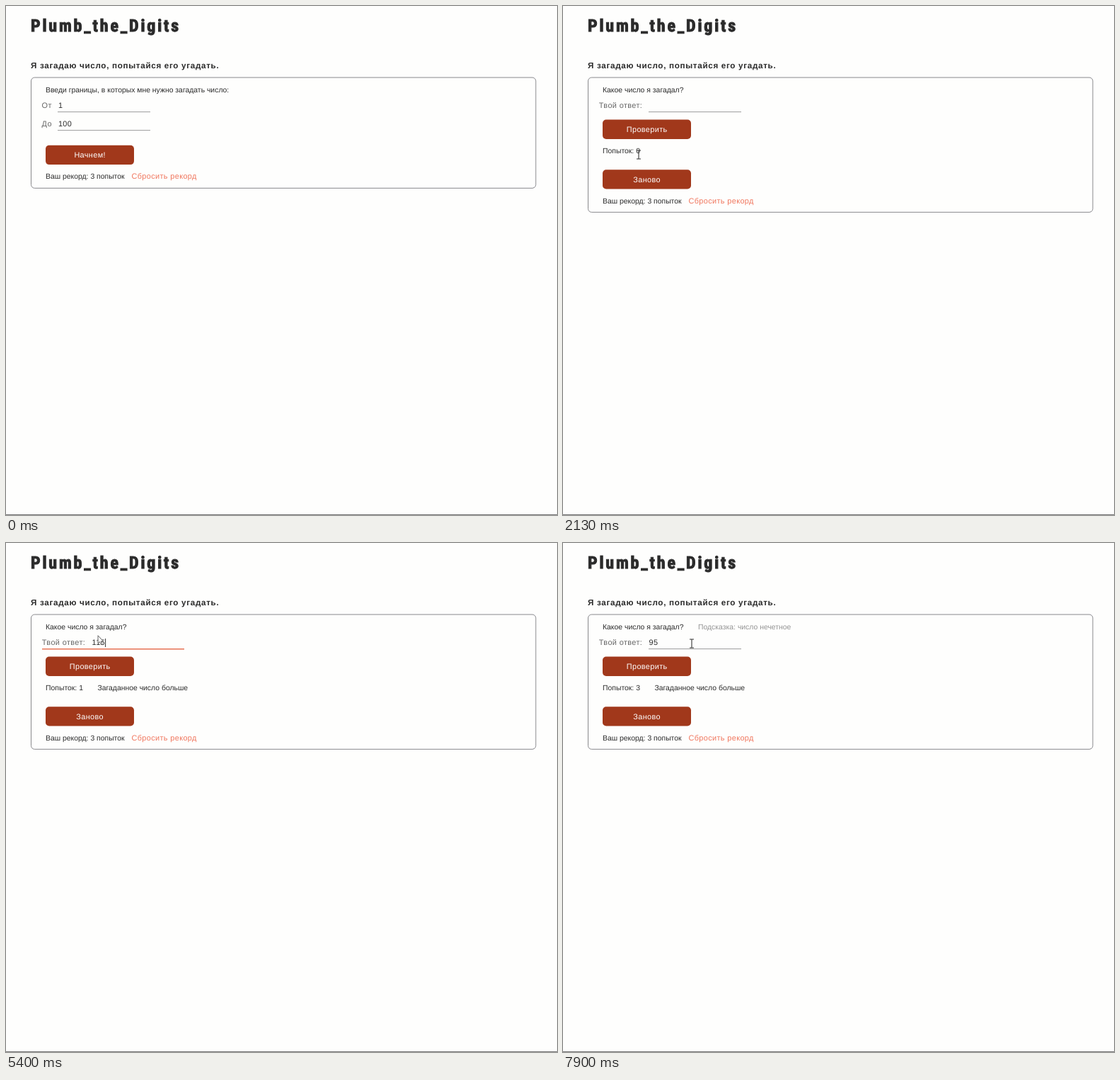
Recreate the animation shown at these times as an HTML page. Size 779x719 px, loop 8 s.

```html
<!DOCTYPE html>
<html lang="ru">
<head>
<meta charset="utf-8">
<title>Plumb_the_Digits</title>
<style>
  html, body { margin: 0; width: 100%; height: 100%; overflow: hidden; background: #fefefd; }
  svg { display: block; width: 779px; height: 719px; }
  text {
    font: 10.42px 'Liberation Sans', Arial, sans-serif;
    fill: #2b2b2b; white-space: pre; text-rendering: geometricPrecision;
  }
  .title {
    font: 700 24px 'Roboto Condensed', Roboto, sans-serif; font-stretch: 75%;
    letter-spacing: 2.8px; stroke: #2b2b2b; stroke-width: 1px;
  }
  .lead { font-size: 11.67px; font-weight: 700; letter-spacing: .68px; }
  .label, .value, .link, .btn-text { font-size: 10.89px; letter-spacing: .39px; }
  .label { fill: #666; }
  .link { fill: #f0755c; }
  .hint { fill: #949494; }
  .btn { fill: #a1381b; }
  .btn-text { fill: #fff; text-anchor: middle; }
  .panel { fill: none; stroke: #88888c; }
  .line { stroke: #9c9c9c; }
  .focus { stroke: #e97557; stroke-width: 1.6; }
  .selection { fill: #2c5fd3; }
  .caret { stroke: #333; }
  .pointer { stroke: #555; stroke-width: .9; stroke-linejoin: round; fill: #fff; }
  .beam { fill: none; stroke: #333; stroke-width: 1.1; }
</style>
</head>
<body>
<svg id="stage" viewBox="0 0 779 719"></svg>
<script>
const LOOP = 8000;
const START = 2040;
const CHAR = 6.44;
const stage = document.getElementById('stage');

function add(parent, tag, attrs, content = '') {
  const el = document.createElementNS('http://www.w3.org/2000/svg', tag);
  for (const key in attrs) el.setAttribute(key, attrs[key]);
  el.textContent = content;
  return parent.appendChild(el);
}
const text = (parent, x, y, content, cls = '') =>
  add(parent, 'text', { x, y, class: cls }, content);
const line = (parent, x1, x2, y, cls) =>
  add(parent, 'line', { x1, x2, y1: y, y2: y, class: cls });
function button(parent, y, label) {
  add(parent, 'rect', { x: 56, y, width: 125, height: 27.3, rx: 5, class: 'btn' });
  text(parent, 118.7, y + 17.5, label, 'btn-text');
}
function record(parent, y) {
  text(parent, 56, y, 'Ваш рекорд: 3 попыток');
  text(parent, 177.4, y, 'Сбросить рекорд', 'link');
}
const show = (el, on) => el.setAttribute('visibility', on ? 'inherit' : 'hidden');

// Fixed parts
text(stage, 35, 35.8, 'Plumb_the_Digits', 'title');
text(stage, 35, 87.7, 'Я загадаю число, попытайся его угадать.', 'lead');
const panel = add(stage, 'rect', { x: 35.5, y: 101, width: 713.5, height: 156.3, rx: 5, class: 'panel' });
add(stage, 'rect', { y: 718, width: 779, height: 1, fill: '#777' });

// Range form
const setup = add(stage, 'g', {});
text(setup, 56, 121.6, 'Введи границы, в которых мне нужно загадать число:');
text(setup, 50.6, 144.2, 'От', 'label');
text(setup, 73.9, 144.4, '1', 'value');
line(setup, 73, 204, 149.6, 'line');
text(setup, 50.6, 170.3, 'До', 'label');
const upper = text(setup, 73.9, 170.4, '', 'value');
line(setup, 73, 204, 175.6, 'line');
const upperFocus = line(setup, 51, 204, 175.8, 'focus');
button(setup, 196.8, 'Начнем!');
record(setup, 244.1);

// Guessing form
const game = add(stage, 'g', {});
text(game, 56, 121.6, 'Какое число я загадал?');
const hint = text(game, 191, 121.6, 'Подсказка: число нечетное', 'hint');
text(game, 50.8, 144.2, 'Твой ответ:', 'label');
const selection = add(game, 'rect', { x: 121.8, y: 134.6, width: 0, height: 12.6, class: 'selection' });
const answer = text(game, 121.5, 144.4, '', 'value');
line(game, 121, 252, 149.6, 'line');
const answerFocus = line(game, 51, 252, 149.8, 'focus');
button(game, 160.6, 'Проверить');
const tries = text(game, 56, 207.7);
const verdict = text(game, 129.4, 207.7);
button(game, 231.2, 'Заново');
record(game, 278.8);

const caret = add(stage, 'line', { class: 'caret' });

// Pointers, each drawn around its hot spot
const pointer = add(stage, 'g', { class: 'pointer' });
const shapes = {
  arrow: add(pointer, 'path', { d: 'M0 0V11L2.5 8.8L4.3 12.8L6 12L4.3 8.2H7.5Z' }),
  hand: add(pointer, 'path', {
    d: 'M-1 -5.5Q0 -7 1 -5.5V-1.5L5 -.5Q6 0 6 1.5L5 6.5H-.5L-4 1.5Q-4 0 -2.5 .5L-1 2Z'
  }),
  beam: add(pointer, 'path', { d: 'M-3 -6H3M0 -6V6M-3 6H3', class: 'beam' })
};

const upperSteps = [[0, '100'], [960, '10'], [1130, '1'], [1330, '15'], [1500, '150']];
const answerSteps = [[0, ''], [2800, '7'], [2830, '75'], [4360, '1'], [4400, '12'],
  [4760, '1'], [4960, '11'], [5060, '115'], [6960, '9'], [7000, '95']];
const checks = [[0, ''], [3330, 'больше'], [5840, 'меньше'], [7580, 'больше']];
const upperFocused = [[540, START]];
const answerFocused = [[2500, 3300], [3620, 5820], [6200, 7560]];
const selected = [[3700, 4360], [6300, 6960]];
const caretOn = [[660, 800], [2560, 2800], [4600, 4760], [5230, 5480], [7160, 7330]];
const path = [
  [0, 0, 0, ''],
  [300, 767, 270, 'arrow'], [480, 215, 180, 'arrow'], [520, 150, 167, 'beam'],
  [580, 150, 167, 'beam'], [660, 219, 224, 'arrow'], [1330, 0, 0, ''],
  [1660, 219, 224, 'arrow'], [1740, 74, 130, 'arrow'], [1790, 74, 130, 'arrow'],
  [1900, 100, 200, 'hand'], [1960, 107, 210, 'hand'], [START, 107, 210, 'beam'],
  [2200, 107, 210, 'beam'], [2300, 125, 175, 'hand'], [2400, 131, 141, 'beam'],
  [2800, 0, 0, ''],
  [3000, 130, 131, 'arrow'], [3040, 131, 141, 'beam'], [3150, 145, 170, 'hand'],
  [3220, 147.5, 176.5, 'hand'], [3400, 147.5, 176.5, 'hand'], [3500, 140, 150, 'beam'],
  [3580, 131, 141, 'beam'], [4360, 0, 0, ''],
  [5400, 130, 131, 'arrow'], [5470, 134, 112, 'arrow'], [5600, 140, 140, 'beam'],
  [5700, 147, 176, 'hand'], [5920, 147, 176, 'hand'], [6040, 130, 150, 'beam'],
  [6160, 117, 141, 'beam'], [6260, 117, 141, 'beam'], [6400, 250, 148, 'beam'],
  [6480, 406.5, 153.5, 'arrow'], [7330, 406.5, 153.5, 'arrow'],
  [7480, 150, 174, 'hand'], [7640, 150, 174, 'hand'], [7740, 178, 150, 'beam'],
  [7800, 182, 142, 'beam']
];

const indexAt = (steps, t) => steps.findLastIndex(step => step[0] <= t);
const valueAt = (steps, t) => steps[indexAt(steps, t)][1];
const spanAt = (spans, t) => spans.find(([from, to]) => t >= from && t < to);
const fadeIn = (spans, t) => {
  const span = spanAt(spans, t);
  return span ? Math.min(1, (t - span[0]) / 130) : 0;
};

function drawPointer(t) {
  const i = indexAt(path, t);
  const [time, x, y, kind] = path[i];
  const next = path[i + 1];
  const k = next && next[3] ? (t - time) / (next[0] - time) : 0;
  const px = k ? x + (next[1] - x) * k : x;
  const py = k ? y + (next[2] - y) * k : y;
  pointer.setAttribute('transform', `translate(${px} ${py})`);
  for (const name in shapes) show(shapes[name], name === kind);
}

function render(t) {
  const playing = t >= START;
  show(setup, !playing);
  show(game, playing);
  panel.setAttribute('height', playing ? 190.3 : 156.3);

  const limit = valueAt(upperSteps, t);
  const guess = valueAt(answerSteps, t);
  upper.textContent = limit;
  answer.textContent = guess;
  upperFocus.style.opacity = fadeIn(upperFocused, t);
  answerFocus.style.opacity = fadeIn(answerFocused, t);

  const marked = spanAt(selected, t);
  selection.setAttribute('width', marked ? guess.length * CHAR - .5 : 0);
  answer.style.fill = marked ? '#fff' : '';

  const count = indexAt(checks, t);
  tries.textContent = 'Попыток: ' + count;
  verdict.textContent = count ? 'Загаданное число ' + checks[count][1] : '';
  show(hint, playing && count > 2);

  const cx = (playing ? 121.3 : 74.1) + (playing ? guess : limit).length * CHAR;
  const cy = playing ? 135 : 161;
  for (const [key, v] of Object.entries({ x1: cx, x2: cx, y1: cy, y2: cy + 12 })) caret.setAttribute(key, v);
  show(caret, spanAt(caretOn, t));
  drawPointer(t);
}

const origin = performance.now();
function tick() {
  render((performance.now() - origin) % LOOP);
  requestAnimationFrame(tick);
}
tick();
</script>
</body>
</html>
```
